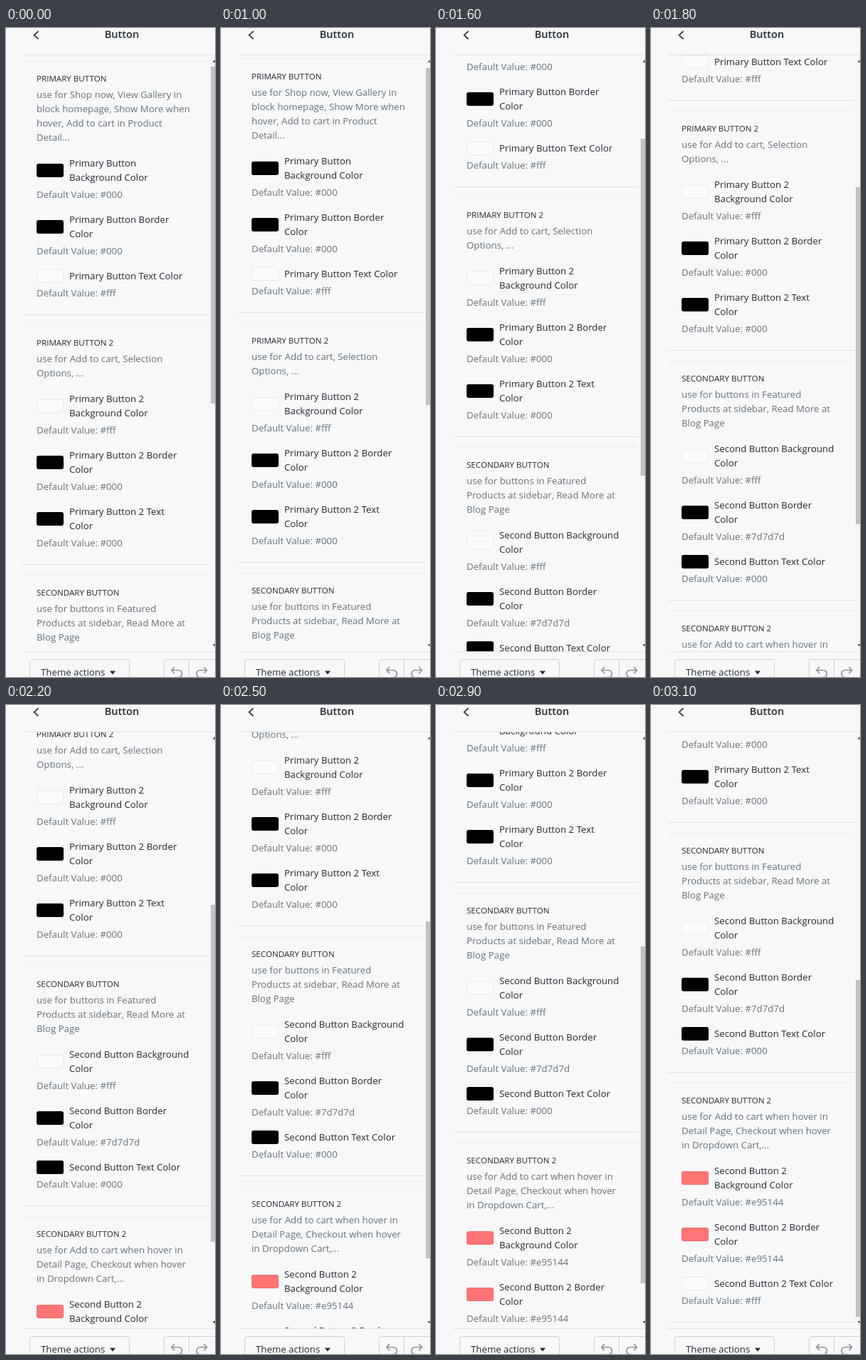
Write an HTML page that moves like this. It is 294x909 px and loops after 4500 ms.

```html
<!DOCTYPE html>
<html lang="en">
<head>
<meta charset="utf-8">
<title>Button settings</title>
<style>
  html, body { margin: 0; width: 100%; height: 100%; overflow: hidden; background: #f8f8f8; }
  body { position: relative; font: 13.25px/20px "Open Sans", "Noto Sans", sans-serif; color: #212b36; white-space: pre; }
  #view { position: absolute; left: 24px; top: 38px; width: 270px; height: 835px; overflow: hidden; }
  #list { position: absolute; top: 8px; left: 0; width: 262px; }
  section { box-sizing: border-box; padding: 15px 0 20px 19px; margin-bottom: 15px;
    box-shadow: inset 0 1px #eee, 0 1px #dcdfe1; }
  h2 { margin: 0 0 2px; font-size: 11.6px; line-height: 20px; font-weight: 500; }
  p { margin: 0; color: #637381; }
  .about { padding-bottom: 1px; }
  .row { display: flex; align-items: center; margin: 15px 0 4px; }
  .row i { box-sizing: border-box; width: 38px; height: 19px; margin-right: 8px; border-radius: 3px; border: 1px solid #0001; }
  #thumb { position: absolute; left: 264px; top: 16px; width: 6px; height: 472px; background: #c1c1c1; }
  h1 { position: absolute; left: 24px; top: -2px; width: 278px; margin: 0; text-align: center;
    font-size: 14.6px; line-height: 20px; font-weight: 600; }
  #theme { position: absolute; left: 49px; top: 892px; }
  svg { position: absolute; left: 0; top: 0; fill: none; }
</style>
</head>
<body>
<div id="view"><div id="list"></div><div id="thumb"></div></div>
<h1>Button</h1>
<div id="theme">Theme actions</div>
<svg width="294" height="909">
  <path d="M24 37.5H294M24 873.5H294" stroke="#dfe3e8"/>
  <path d="M45.5 4.5L39.5 10L45.5 15.5" stroke="#36424e" stroke-width="1.8"/>
  <path d="M290.5 48L294.5 44L298.5 48ZM290.5 863L294.5 867L298.5 863Z" fill="#444"/>
  <g stroke="#c9d0d7">
    <rect x="33.5" y="884.5" width="140" height="40" rx="3"/>
    <rect x="222.5" y="884.5" width="90" height="40" rx="3"/>
    <path d="M257.5 884V909"/>
  </g>
  <path d="M146 900.5H154L150 905.5Z" fill="#212b36"/>
  <g stroke="#8995a1" stroke-width="1.7">
    <path id="undo" d="M237 895L233 899.5L237 904M233 899.5H242.5A5 5 0 0 1 242.5 909.5H237"/>
    <use href="#undo" transform="matrix(-1 0 0 1 515.5 0)"/>
  </g>
</svg>
<script>
const fills = { '#000': '#000', '#fff': '#fbfbfb', '#7d7d7d': '#000', '#e95144': '#ff7474' };
const sections = [
  ['PRIMARY BUTTON',
    'use for Shop now, View Gallery in\nblock homepage, Show More when\nhover, Add to cart in Product\nDetail...',
    ['Primary Button\nBackground Color', '#000'],
    ['Primary Button Border\nColor', '#000'],
    ['Primary Button Text Color', '#fff']],
  ['PRIMARY BUTTON 2',
    'use for Add to cart, Selection\nOptions, ...',
    ['Primary Button 2\nBackground Color', '#fff'],
    ['Primary Button 2 Border\nColor', '#000'],
    ['Primary Button 2 Text\nColor', '#000']],
  ['SECONDARY BUTTON',
    'use for buttons in Featured\nProducts at sidebar, Read More at\nBlog Page',
    ['Second Button Background\nColor', '#fff'],
    ['Second Button Border\nColor', '#7d7d7d'],
    ['Second Button Text Color', '#000']],
  ['SECONDARY BUTTON 2',
    'use for Add to cart when hover in\nDetail Page, Checkout when hover\nin Dropdown Cart,...',
    ['Second Button 2\nBackground Color', '#e95144'],
    ['Second Button 2 Border\nColor', '#e95144'],
    ['Second Button 2 Text Color', '#fff']]
];

const list = document.getElementById('list');
const thumb = document.getElementById('thumb');

const setting = ([label, value]) =>
  `<div class="row"><i style="background:${fills[value]}"></i><span>${label}</span></div>` +
  `<p>Default Value: ${value}</p>`;

list.innerHTML = sections.map(([title, about, ...rows]) =>
  `<section><h2>${title}</h2><p class="about">${about}</p>${rows.map(setting).join('')}</section>`).join('');

// Wheel glides: start ms, end ms, distance
const glides = [
  [975, 1200, 100], [1450, 1800, 200], [2020, 2200, 100], [2420, 2600, 100], [2875, 3100, 87]
];

function scrollAt(ms) {
  return glides.reduce((sum, [start, end, dist]) => {
    const u = Math.min(1, Math.max(0, (ms - start) / (end - start)));
    return sum + dist * u * u * (3 - 2 * u);
  }, 0);
}

function draw() {
  const ms = performance.now() % 4500;
  const y = Math.round(scrollAt(Math.floor(ms / 100) * 100)); // ten steps a second
  list.style.transform = `translateY(${-y}px)`;
  thumb.style.transform = `translateY(${Math.round(y * 0.564)}px)`;
  requestAnimationFrame(draw);
}
draw();
</script>
</body>
</html>
```
